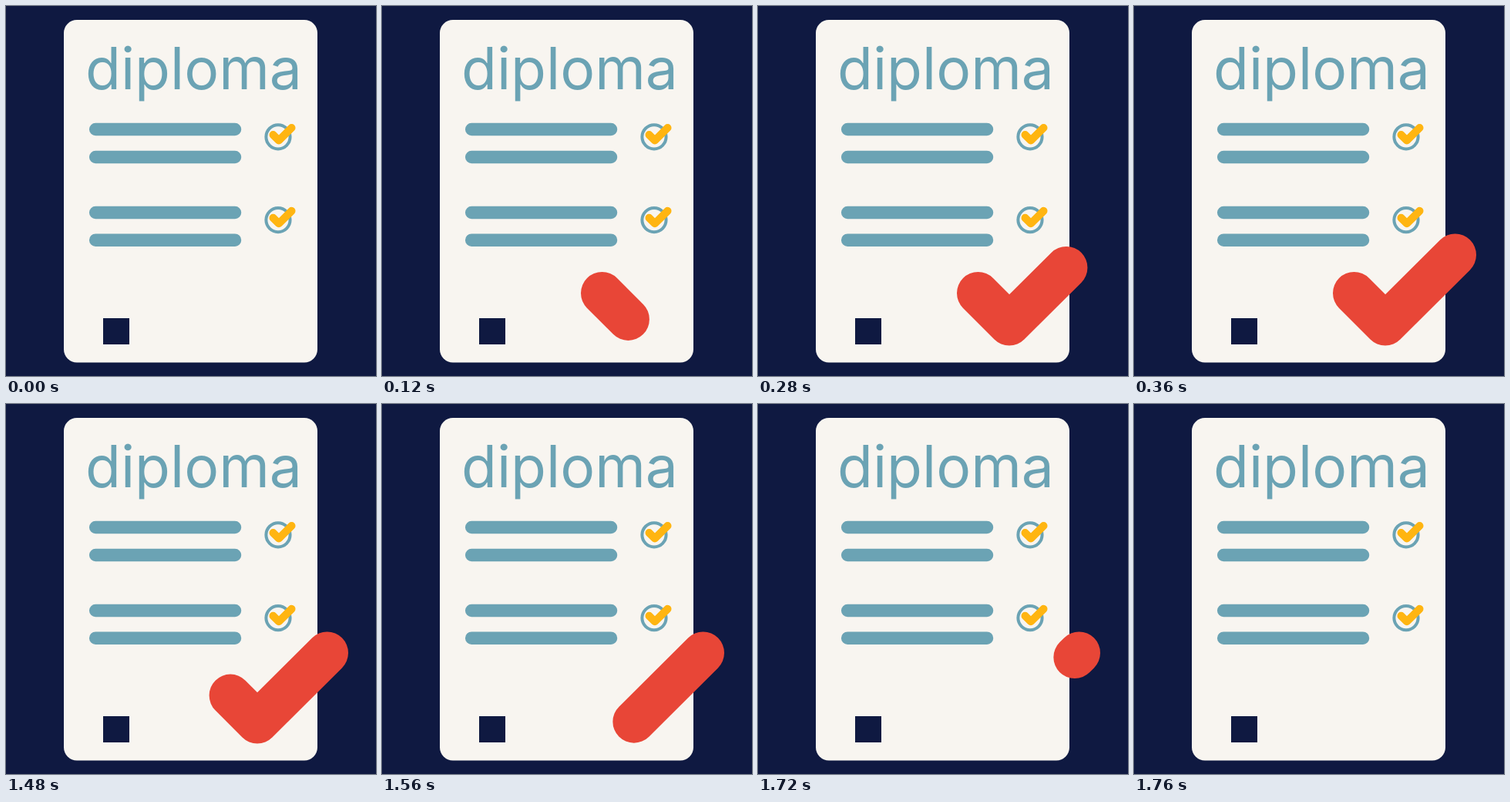
An HTML page that plays this animation: 480x480 px, repeating every 1.92 s.

```html
<!DOCTYPE html>
<html lang="en">
<head>
<meta charset="utf-8">
<title>Diploma</title>
<style>
  html, body { margin: 0; width: 100%; height: 100%; overflow: hidden; background: #0f1941; }
  svg { display: block; width: 100%; height: 100%; }
  .title { font: 400 75px Inter, sans-serif; fill: #6ba3b4; }
  .bars { stroke: #6ba3b4; stroke-width: 16.5; stroke-linecap: round; }
  .ring { fill: none; stroke: #6ba3b4; stroke-width: 4; }
  .tick { fill: none; stroke-width: 55; stroke-linecap: round; stroke-linejoin: round; }
</style>
</head>
<body>
<svg viewBox="0 0 480 480">
  <defs>
    <path id="tick" class="tick" d="M285.5 372.5L326 413L416.5 323"/>
    <g id="item">
      <circle class="ring" cx="353" cy="169.8" r="15.6"/>
      <use href="#tick" stroke="#ffb511" transform="translate(341.5 153) scale(.183) translate(-258 -295.5)"/>
    </g>
  </defs>
  <rect x="75" y="18" width="329" height="444.5" rx="17" fill="#f8f5f0"/>
  <text class="title" x="103" y="108">diploma</text>
  <path class="bars" d="M116.2 160H297M116.2 196H297M116.2 268H297M116.2 303.7H297"/>
  <use href="#item"/>
  <use href="#item" y="107.8"/>
  <rect x="126" y="405" width="34" height="34" fill="#0f1941"/>
  <path id="check" class="tick" d="M285.5 372.5L326 413L416.5 323" stroke="#e84637"/>
</svg>
<script>
  const LOOP = 1920, STEP = 40;
  const DRAW = [0, 360], ERASE = [1440, 1760];
  const check = document.getElementById('check');
  const length = check.getTotalLength();

  function ease(time, [from, to]) {
    const t = Math.min(1, Math.max(0, (time - from) / (to - from)));
    return t * t * (3 - 2 * t);
  }

  // Visible stretch of the stroke, held for one step
  function pose(time) {
    const tail = ease(time, ERASE) * length;
    const head = ease(time, DRAW) * length;
    return {
      offset: time / LOOP,
      easing: 'steps(1, end)',
      strokeDasharray: `${Math.max(0, head - tail)} 1000`,
      strokeDashoffset: `${-tail}`,
      visibility: head - tail > 0.01 ? 'visible' : 'hidden'
    };
  }

  const poses = Array.from({ length: LOOP / STEP + 1 }, (_, i) => pose(i * STEP));
  check.animate(poses, { duration: LOOP, iterations: Infinity });
</script>
</body>
</html>
```
